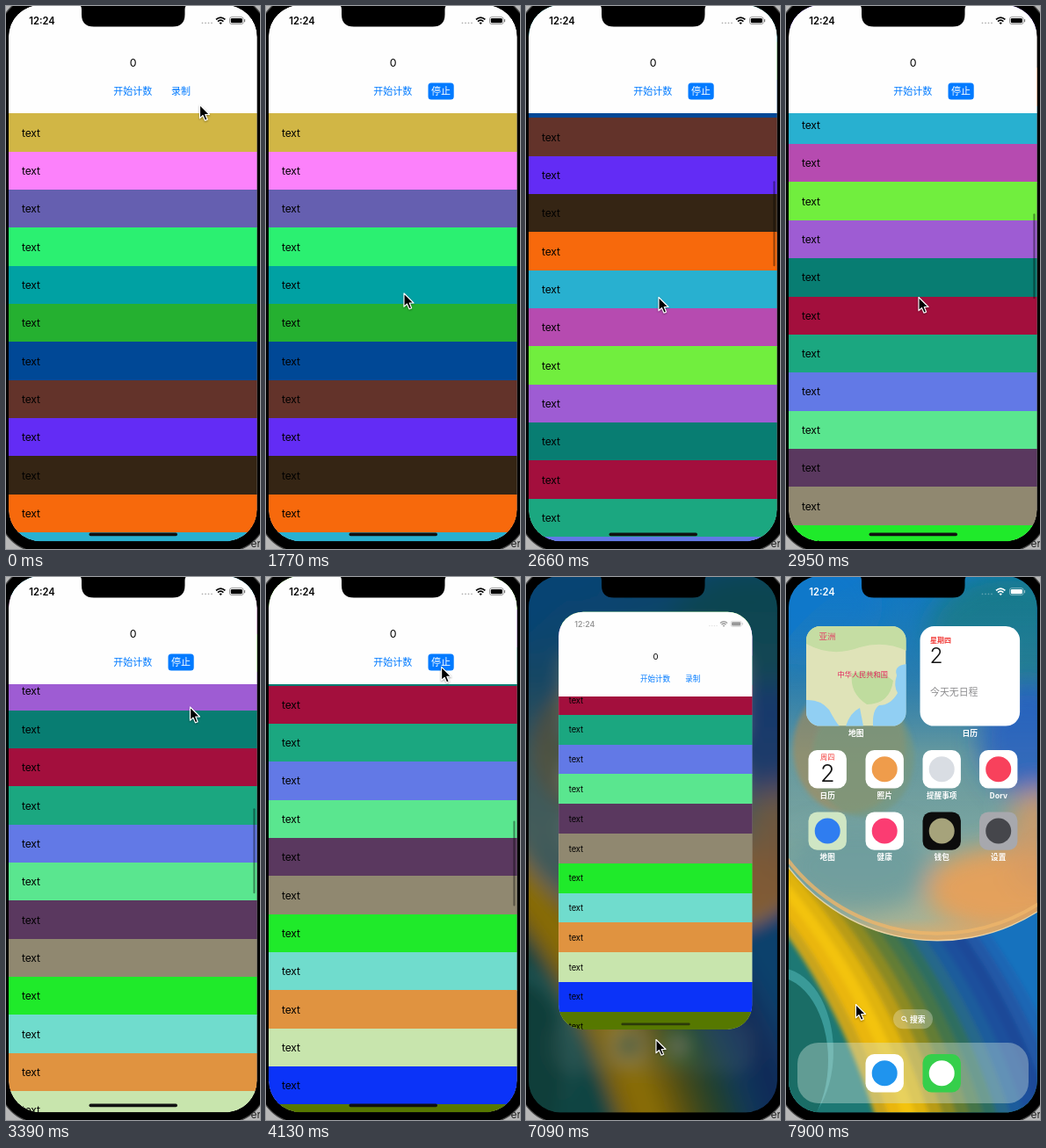
Recreate the animation shown at these times as an HTML page. Size 289x618 px, loop 8 s.

```html
<!DOCTYPE html>
<html lang="zh-CN">
<head>
<meta charset="utf-8">
<title>Scroll recorder</title>
<style>
html, body { margin: 0; width: 100%; height: 100%; overflow: hidden; background: #b8b8b8; }
svg { display: block; width: 100vw; height: 100vh; }
text { font-family: Inter, "Noto Sans CJK SC", "Noto Sans CJK", sans-serif; }
.cjk { font-family: "Noto Sans CJK SC", "Noto Sans CJK", sans-serif; }
.mid { text-anchor: middle; }
</style>
</head>
<body>
<svg id="stage" viewBox="0 0 289 618" xmlns="http://www.w3.org/2000/svg"></svg>
<script>
const LOOP = 8000, ROW = 43.35, TOP = 122.3;
const SCREEN = { x: 3, y: -1, w: 282.7, h: 610.2, r: 36 };
const ROW_COLORS = ('d1b645 fc81fb 655fb0 2bf071 00a1a3 25b030 004896 63332a 632cf5 352514 ' +
  'f7690c 28b0d0 b64bb0 71ee3e 9e5cd3 087d72 a30f3d 1ba780 6279e6 5ae68f ' +
  '5a385f 908870 1fea2a 70dccd e09340 c8e5ad 0b33f8 567800').split(' ');
const BAND_COLORS = ('c9a41c eab608 f3c30b e0b40e b99c18 8c8a22 647d35 457548 2f6e60 ' +
  '25678a 1f5c9c 1c4f9c 1d4a98 2058a6 1d66b4 1672be').split(' ');

// The picture only changes at these moments: [first, last, count]
const STAMPS = [[0, 0, 1], [300, 900, 5], [1190, 1770, 5], [2220, 3250, 8], [3390, 4430, 8],
  [4570, 5600, 8], [5750, 5750, 1], [6200, 6490, 3], [6790, 7090, 3], [7480, 7480, 1], [7900, 7900, 1]]
  .flatMap(([a, b, n]) => Array.from({ length: n }, (_, i) =>
    Math.floor((a + (b - a) * i / Math.max(1, n - 1)) / 10) * 10));

// time, x, y
const POINTER = [[0, 220.5, 112.5], [300, 217, 110], [450, 209, 103], [600, 202, 98], [900, 198, 96],
  [1190, 198, 96], [1330, 196, 104], [1480, 186, 180], [1620, 165, 290], [1770, 157, 327],
  [2220, 157, 327], [2660, 151, 331.5], [2950, 151, 331.5], [3250, 190, 200], [3390, 209.5, 148],
  [3530, 206, 116], [3830, 201, 103], [5150, 195, 100], [5300, 175, 230], [5450, 148, 440],
  [5600, 134.5, 531], [5750, 135, 530.5], [6200, 132, 565], [6340, 126, 595], [6490, 123, 604],
  [6790, 133, 583], [6940, 143, 548], [7090, 148, 526.5], [7480, 118, 508], [7900, 79.5, 486.5]];
const SHRINK = [[6490, 1], [6790, .94], [6940, .84], [7090, .779], [7480, .3]];
const BAR_FADE = [[5750, .4], [6200, .25], [6340, .1], [6490, 0]];
// time, blur, dimming, icon scale, icon opacity
const HOME = [[7090, 9, .43, .88, .45], [7480, 2.5, .12, .95, .85], [7900, 0, 0, 1, 1]];

const rect = (x, y, w, h, r, fill, more = '') =>
  `<rect x="${x}" y="${y}" width="${w}" height="${h}" rx="${r}" fill="${fill}" ${more}/>`;
const disc = (x, y, r, fill) => `<circle cx="${x}" cy="${y}" r="${r}" fill="${fill}"/>`;
const blob = (x, y, rx, ry, fill, o = 1) =>
  `<ellipse cx="${x}" cy="${y}" rx="${rx}" ry="${ry}" fill="${fill}" opacity="${o}"/>`;
const path = (d, fill, more = '') => `<path d="${d}" fill="${fill}" ${more}/>`;
const label = (s, x, y, size, fill, more = '') =>
  `<text x="${x}" y="${y}" font-size="${size}" fill="${fill}" ${more}>${s}</text>`;
const cjk = (s, x, y, size, fill, mid = '', weight = 400) =>
  label(s, x, y, size, fill, `class="cjk ${mid}" font-weight="${weight}"`);
const grad = (id, stops) =>
  `<linearGradient id="${id}" x1="0" y1="0" x2="0" y2="1">` + stops.map(([at, c, o = 1]) =>
    `<stop offset="${at}" stop-color="${c}" stop-opacity="${o}"/>`).join('') + '</linearGradient>';
const screenRect = (fill, more) => rect(SCREEN.x, SCREEN.y, SCREEN.w, SCREEN.h, SCREEN.r, fill, more);

function statusBar(color) {
  const dots = [223.5, 227, 230.5, 234].map(x => disc(x, 19.3, .9, color)).join('');
  return label('12:24', 26.3, 20.9, 11.2, color, 'font-weight="600"') +
    `<g opacity=".3">${dots}</g>` +
    `<g fill="none" stroke="${color}" stroke-width="1.7">
      <path d="M239 15.4Q244.2 10.8 249.4 15.4"/><path d="M241 17.6Q244.2 14.8 247.4 17.6"/></g>` +
    path('M242.5 19.2Q244.2 17.8 245.9 19.2L244.2 21Z', color) +
    rect(254.5, 12.6, 15.6, 8, 2.3, 'none', `stroke="${color}" stroke-width=".8" opacity=".5"`) +
    rect(255.8, 13.9, 13, 5.4, 1.3, color) + rect(271, 15, 1.1, 3.2, .5, color, 'opacity=".5"');
}

function wallpaper() {
  // Each band covers everything to the right of its curve
  const bands = BAND_COLORS.map((c, i) => {
    const d = i * 15.5 - 6;
    return path(`M${d - 80} 300C${d - 20} 370 ${d + 65} 460 ${d + 115} 640H440V300Z`, '#' + c);
  }).join('');
  return rect(-40, -40, 370, 700, 0, 'url(#sky)') +
    '<g filter="url(#soft)">' + blob(255, 65, 95, 70, '#147a80', .9) + blob(20, 30, 90, 70, '#0f79cc', .8) + '</g>' +
    rect(-40, 330, 370, 330, 0, '#1d7874') +
    blob(-8, 540, 62, 95, '#3a9a98') + blob(-12, 550, 60, 95, '#1a6d66') +
    `<g filter="url(#smooth)">${bands}</g>` +
    disc(172, 200, 214, 'url(#planet)') +
    `<g clip-path="url(#planetClip)"><g filter="url(#soft)">` +
    blob(275, 185, 55, 65, '#2459c4', .75) + blob(245, 355, 85, 48, '#eda055', .9) +
    blob(285, 300, 35, 60, '#d99a62', .8) + blob(80, 330, 85, 50, '#6b9c9e', .8) + '</g>' +
    `<g filter="url(#smooth)">` + blob(72, 195, 64, 74, '#a98a56', .6) + blob(88, 205, 58, 68, '#78977c', .65) + '</g></g>' +
    path('M-40 221A214 214 0 0 0 384 221', 'none', 'stroke="#eeb66b" stroke-width="4" opacity=".8"') +
    path('M-10 312A214 214 0 0 0 286 381', 'none', 'stroke="#f7dfb0" stroke-width="1.4" opacity=".8"');
}

function homeIcons() {
  const tile = (x, y, name, fill, inner = '') =>
    rect(x, y, 43.4, 43.4, 10, fill) + inner + (name ? cjk(name, x + 21.7, y + 54.8, 8.6, '#fff', 'mid', 700) : '');
  const app = (x, y, name, fill, dot) => tile(x, y, name, fill, disc(x + 21.7, y + 21.7, 14.5, dot));
  const X = [25.5, 90.5, 155.5, 220];
  return '<g clip-path="url(#mapClip)">' + rect(23, 56, 113.6, 113.6, 0, '#dfe3b8') +
    path('M23 56H137V84Q112 72 84 80Q52 92 23 76Z', '#c5dda3') +
    path('M75 110Q105 102 122 118Q118 145 92 145Q72 132 75 110Z', '#bfdc9e') +
    path('M137 99Q122 101 126 112Q122 124 127 132Q119 146 106 146Q98 151 99 170H137Z', '#91cff3') +
    path('M23 140Q39 139 49 151Q57 166 61 170H23Z', '#91cff3') + path('M68 170Q73 154 84 149L88 170Z', '#91cff3') +
    '</g>' +
    cjk('亚洲', 37.5, 70.5, 9.4, '#e33a62') + cjk('中华人民共和国', 58.5, 113.8, 8.2, '#e3245c', '', 500) +
    cjk('地图', 79.7, 181.3, 8.8, '#fff', 'mid', 700) +
    rect(152.5, 56, 113.6, 113.6, 16, '#fff') + cjk('星期四', 164, 75, 8, '#f23b38', '', 700) +
    label('2', 163.5, 98.3, 24.5, '#111', 'font-weight="300"') + cjk('今天无日程', 164, 135, 10.9, '#8c8c8e') +
    cjk('日历', 209.2, 181.3, 8.8, '#fff', 'mid', 700) +
    tile(X[0], 197, '日历', '#fff', cjk('周四', 47.2, 208, 8.2, '#f23b38', 'mid', 500) +
      label('2', 47.2, 232.5, 27, '#111', 'class="mid" font-weight="300"')) +
    app(X[1], 197, '照片', '#fff', '#ef9c4b') + app(X[2], 197, '提醒事项', '#fff', '#d9dde3') +
    app(X[3], 197, 'Dorv', '#fff', '#f8415c') +
    app(X[0], 267.4, '地图', '#cfe6c4', '#2f7df0') + app(X[1], 267.4, '健康', '#fff', '#fb3c72') +
    app(X[2], 267.4, '钱包', '#0c0c0c', '#a6a37b') + app(X[3], 267.4, '设置', '#a7a8ad', '#45464b') +
    rect(122, 492, 45, 22.3, 11.1, '#fff', 'opacity=".28"') +
    '<circle cx="134" cy="502.4" r="2.3" fill="none" stroke="#fff"/>' +
    path('M135.7 504.1L138 506.4', 'none', 'stroke="#fff" stroke-width="1.2"') +
    cjk('搜索', 141, 506.5, 8.8, '#fff', '', 700) +
    rect(13, 530, 263, 69, 24, '#d5e8df', 'opacity=".38"') +
    app(X[1], 543, '', '#fff', '#1f94ee') + app(X[2], 543, '', '#35cf4b', '#fff');
}

function appScreen() {
  const rows = ROW_COLORS.map((c, i) => {
    const y = TOP + i * ROW;
    return rect(0, y, 289, ROW + .2, 0, '#' + c, 'shape-rendering="crispEdges"') +
      label('text', 17.9, y + 26.3, 12.1, '#000', 'letter-spacing="-.1"');
  }).join('');
  return screenRect('#fefefe') + `<g id="rows">${rows}</g>` +
    rect(0, -2, 289, TOP + 2, 0, '#fefefe', 'shape-rendering="crispEdges"') +
    rect(281.4, 0, 2, 97, 1, '#000', 'id="bar"') +
    `<g id="appStatus">${statusBar('#000')}</g>` +
    label('0', 144.6, 68.9, 12.3, '#000', 'class="mid"') +
    cjk('开始计数', 122.2, 100.6, 11, '#007aff') +
    `<g id="idle">${cjk('录制', 199, 100.6, 11, '#007aff', 'mid')}</g>` +
    `<g id="busy">${rect(184.5, 87.4, 29.2, 19.2, 3.6, '#007aff')}${cjk('停止', 199, 100.6, 11, '#fff', 'mid')}</g>` +
    rect(94.5, 599.6, 100.5, 3.6, 1.8, '#111', 'id="homeBar"');
}

const stage = document.getElementById('stage');
const blurFilter = (id, sd, more = '') =>
  `<filter id="${id}" x="-50%" y="-50%" width="200%" height="200%"><feGaussianBlur ${more} stdDeviation="${sd}"/></filter>`;
stage.innerHTML = '<defs>' +
  grad('sky', [[0, '#0c79c8'], [.35, '#2277b0'], [.68, '#215aa2'], [1, '#166872']]) +
  grad('planet', [[0, '#1979bd', 0], [.3, '#3a83a5', .5], [.5, '#6d9c9c', .9], [.8, '#83aaa1'], [.94, '#a5b296'], [1, '#e3ac68']]) +
  `<clipPath id="screenClip">${screenRect('#000')}</clipPath>
  <clipPath id="planetClip">${disc(172, 200, 214, '#000')}</clipPath>
  <clipPath id="mapClip">${rect(23, 56, 113.6, 113.6, 16, '#000')}</clipPath>` +
  blurFilter('soft', 14) + blurFilter('smooth', 2.5) +
  `<filter id="haze" filterUnits="userSpaceOnUse" x="-30" y="-30" width="350" height="680">
    <feGaussianBlur id="hazeBlur" stdDeviation="0"/></filter>
  <filter id="drop" x="-50%" y="-50%" width="200%" height="200%">
    <feDropShadow dx="0" dy="1" stdDeviation=".9" flood-opacity=".4"/></filter></defs>` +
  rect(0, 0, 289, 618, 0, '#b8b8b8') + label('er', 278.5, 616, 12, '#222') +
  rect(-8, -12, 305, 633, 46, '#000', 'stroke="#4a4a4a" stroke-width="1.2"') +
  `<g clip-path="url(#screenClip)">
    <g id="home">
      <g id="scene">${wallpaper()}<g id="icons">${homeIcons()}</g></g>
      ${rect(0, -2, 289, 614, 0, '#000', 'id="dim"')}
      <g id="homeStatus">${statusBar('#fff')}</g>
    </g>
    <g id="app"><g clip-path="url(#screenClip)">${appScreen()}</g></g>
  </g>` +
  path('M82 -2Q86 -1 86 4V9.5Q86 23.5 100 23.5H189.5Q203.5 23.5 203.5 9.5V4Q203.5 -1 207.5 -2Z', '#000') +
  path('M0 0V15.2L3.5 12L6 17.8L8.6 16.7L6.2 11H11Z', '#000',
    'id="pointer" stroke="#fff" stroke-width="1.1" stroke-linejoin="round" filter="url(#drop)"');

const el = Object.fromEntries([...stage.querySelectorAll('[id]')].map(e => [e.id, e]));
const set = (name, attr, value) => el[name].setAttribute(attr, value);
const show = (name, on) => set(name, 'display', on ? 'inline' : 'none');

// Linear interpolation through [time, ...values] keys
function track(keys, t) {
  const i = keys.findIndex(k => k[0] > t);
  if (i === 0) return keys[0].slice(1);
  if (i < 0) return keys[keys.length - 1].slice(1);
  const a = keys[i - 1], b = keys[i], p = (t - a[0]) / (b[0] - a[0]);
  return a.slice(1).map((v, j) => v + (b[j + 1] - v) * p);
}

// A short drag, then momentum that decays exponentially
function scrollAt(t) {
  if (t < 2220) return 0;
  if (t < 2500) return track([[2220, 4], [2360, 40], [2500, 140]], t)[0];
  return 712 - 413.5 * Math.exp(-.002074 * (Math.min(t, 5160) - 2660));
}

function drawApp(t) {
  const scroll = scrollAt(t);
  set('rows', 'transform', `translate(0 ${-scroll})`);
  set('bar', 'y', 140 + .1985 * scroll);
  set('bar', 'opacity', t < 2220 ? 0 : track(BAR_FADE, t)[0]);

  const recording = t >= 1190 && t < 5000;
  show('busy', recording);
  show('idle', !recording);

  const s = track(SHRINK, t)[0], p = (1 - s) / .221, near = Math.min(p, 1);
  const y = Math.min(-1 + 40.65 * p, 150);
  set('app', 'transform', `translate(${144.3 + 2.9 * near} ${y}) scale(${s}) translate(-144.3 1)`);
  set('app', 'opacity', t < 7480 ? 1 : .4);
  show('app', t < 7900);
  set('appStatus', 'opacity', 1 - .6 * near);
  set('homeBar', 'opacity', 1 - .4 * near);
}

function drawHome(t) {
  const [blur, dim, scale, opacity] = track(HOME, t);
  show('home', t > 6490);
  show('homeStatus', t >= 7480);
  set('hazeBlur', 'stdDeviation', blur);
  set('scene', 'filter', blur ? 'url(#haze)' : 'none');
  set('dim', 'opacity', dim);
  set('icons', 'transform', `translate(144.5 305) scale(${scale}) translate(-144.5 -305)`);
  set('icons', 'opacity', opacity);
}

let shown = -1;
function draw(time) {
  const t = STAMPS.filter(s => s <= time).pop();
  if (t === shown) return;
  shown = t;
  drawApp(t);
  drawHome(t);
  set('pointer', 'transform', `translate(${track(POINTER, t).join(' ')})`);
}

const start = performance.now();
(function tick() {
  draw((performance.now() - start) % LOOP);
  requestAnimationFrame(tick);
})();
</script>
</body>
</html>
```
